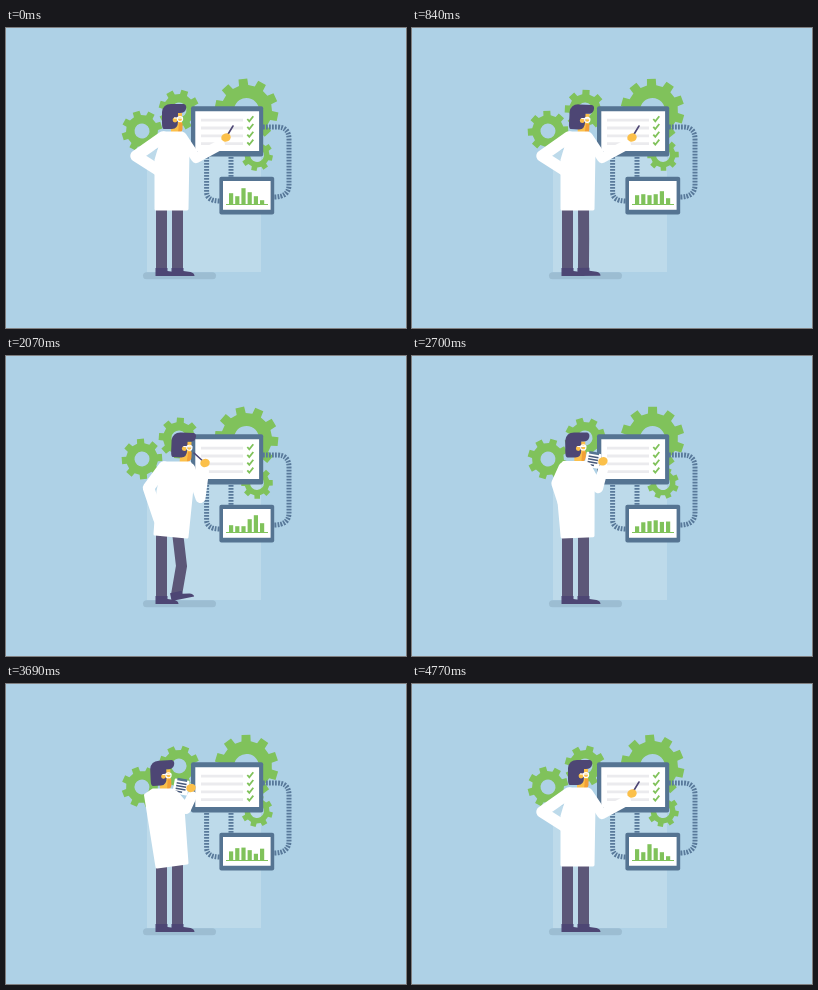
Write an HTML page with a canvas that moves like this. It is 400 by 300 pixels and loops after 4800 ms.

```html
<!DOCTYPE html>
<html>
<head>
<meta charset="utf-8">
<style>
  html, body { margin: 0; width: 100%; height: 100%; overflow: hidden; background: #aed1e6; }
  canvas { display: block; width: 400px; height: 300px; }
</style>
</head>
<body>
<canvas id="stage" width="400" height="300"></canvas>
<script>
const ctx = document.getElementById('stage').getContext('2d');
const LOOP = 4800;
const SKY = '#aed1e6', GREEN = '#80c25b', STEEL = '#557492', NAVY = '#4d4674', LEG = '#5c5778', SKIN = '#fbc04a';

const mix = (a, b, k) => Array.isArray(a) ? a.map((v, i) => mix(v, b[i], k)) : a + (b - a) * k;
const ease = k => k * k * (3 - 2 * k);
const bump = (t, from, to) => t > from && t < to ? Math.sin(Math.PI * (t - from) / (to - from)) ** 2 : 0;

// Points are flat x, y pairs; head is x, y, tilt.
const point = {
  head: [168, 104, 0],
  coat: [158, 105, 176, 105, 182, 122, 181, 181, 150, 181, 150, 132],
  back: [157, 109, 130, 128, 152, 142],
  arm: [176, 109, 190, 130, 214, 117],
  hand: [220, 109.5], pen: [227, 98]
};
const think = {
  head: [176.8, 104.5, 0.04],
  coat: [158, 107, 184, 107, 187, 122, 181, 181, 149, 178, 152, 135],
  back: [158, 111, 142.5, 132, 153, 163],
  arm: [184, 112, 194.5, 142, 198, 115],
  hand: [199, 107], pen: [188, 97]
};
const read = {
  head: [157, 104.5, -0.04],
  coat: [147, 106, 166, 106, 177, 124, 181, 179, 151, 183, 139.5, 111],
  back: [148, 112, 147, 124, 157, 155],
  arm: [168, 111, 180, 125, 186, 112],
  hand: [185, 104], pen: [183, 99]
};
const poses = [[0, point], [880, point], [1250, think], [2480, think], [2880, read], [4290, read], [4620, point], [LOOP, point]];
const charts = [
  [0, [11, 8, 16, 12, 8, 4]], [840, [9, 10, 9, 10, 13, 6]], [1350, [5, 13, 5, 12, 18, 9]],
  [2070, [7, 6, 6, 13, 17, 9]], [3240, [5, 13, 15, 11, 5, 12]], [4170, [13, 11, 10, 9, 8, 11]],
  [4740, [11, 8, 16, 12, 8, 4]], [LOOP, [11, 8, 16, 12, 8, 4]]
];

function span(keys, t) {
  const i = keys.findIndex(k => k[0] > t);
  const [[t0, a], [t1, b]] = [keys[i - 1], keys[i]];
  return [a, b, ease((t - t0) / (t1 - t0))];
}

function trace(pts, close) {
  ctx.beginPath();
  for (let i = 0; i < pts.length; i += 2) ctx.lineTo(pts[i], pts[i + 1]);
  if (close) ctx.closePath();
}
function line(pts, color, width, cap = 'butt') {
  trace(pts);
  ctx.strokeStyle = color;
  ctx.lineWidth = width;
  ctx.lineCap = cap;
  ctx.lineJoin = cap === 'round' ? 'round' : 'miter';
  ctx.stroke();
}
function softShape(pts, color, width) {
  trace(pts, true);
  ctx.fillStyle = ctx.strokeStyle = color;
  ctx.lineWidth = width;
  ctx.lineJoin = 'round';
  ctx.fill();
  ctx.stroke();
}
function box(x, y, w, h, color, r = 0) {
  ctx.fillStyle = color;
  ctx.beginPath();
  ctx.roundRect(x, y, w, h, r);
  ctx.fill();
}
function fillPath(d, color) {
  ctx.fillStyle = color;
  ctx.fill(new Path2D(d));
}
function placed(x, y, angle, draw) {
  ctx.save();
  ctx.translate(x, y);
  ctx.rotate(angle);
  draw();
  ctx.restore();
}

function gear(x, y, radius, root, hole, teeth, angle) {
  placed(x, y, angle, () => {
    const step = 2 * Math.PI / teeth;
    ctx.beginPath();
    for (let i = 0; i < teeth; i++) {
      for (const [r, a] of [[root, -.29], [radius, -.22], [radius, .22], [root, .29]]) {
        const turn = (i + a) * step;
        ctx.lineTo(r * Math.cos(turn), r * Math.sin(turn));
      }
    }
    ctx.closePath();
    ctx.moveTo(hole, 0);
    ctx.arc(0, 0, hole, 0, 7);
    ctx.fillStyle = GREEN;
    ctx.fill('evenodd');
  });
}

function machine(t) {
  const turn = Math.PI * t / LOOP;
  box(141, 122, 114, 122, '#bddaea');
  gear(136, 103, 20.5, 16, 7.5, 8, .49 - turn);
  gear(173, 82, 20.5, 16, 7.5, 8, .29 + turn);
  gear(240.5, 82.5, 32, 25.5, 12.5, 10, .2 - turn);
  gear(251, 127, 16, 12.5, 7, 8, .2 + turn);

  ctx.strokeStyle = '#58799a';
  ctx.lineWidth = 5;
  ctx.lineCap = 'butt';
  ctx.setLineDash([1.8, 1.2]);
  ctx.stroke(new Path2D('M257 99H271Q283 99 283 111V157Q283 169 268 169M200.6 129V164Q200.6 173 214 173M225 129V149'));
  ctx.setLineDash([]);

  box(185, 78.3, 72.2, 50.2, STEEL, 2);
  box(189.3, 83.2, 63.8, 39.8, '#fff');
  for (let i = 0; i < 4; i++) {
    const y = 91 + i * 7.8;
    box(195, y - .2, 42, 2.8, '#ebebee');
    line([241.3, y, 243.3, y + 2.3, 247.3, y - 2.8], GREEN, 1.8);
  }

  box(213.4, 148.7, 54.8, 37.8, STEEL, 2);
  box(217, 153, 47.6, 28.8, '#fff');
  box(220, 176, 42, 1, GREEN);
  const heights = mix(...span(charts, t));
  heights.forEach((h, i) => box(223 + i * 6.2, 176.2 - h, 4.2, h, GREEN));
}

function shoe(x, y, angle) {
  placed(x, y, angle, () => fillPath('M-6-3H6V0L13 1Q17 2 17 5H-6Z', NAVY));
}

function head([x, y, tilt]) {
  placed(x, y, tilt, () => {
    fillPath('M-3-19H8V-4Q8 0 4 2H-3Z', SKIN);
    fillPath('M5-9H8.5V-3Q8 1 4 1Z', '#f29f36');
    fillPath('M-12-20Q-11-28-3-28H10Q13-27 12-23Q11-19 6-19H4V-11Q4-3-2-3H-10Q-12-3-12-9Z', NAVY);
    ctx.beginPath();
    ctx.arc(1, -12, 2.4, 0, 7);
    ctx.fillStyle = SKIN;
    ctx.fill();
    line([0, -14, 9, -14], '#fff', 1.2);
    ctx.strokeStyle = '#fff';
    ctx.lineWidth = 1.2;
    ctx.beginPath();
    ctx.ellipse(6, -13, 2.6, 2.5, 0, 0, 7);
    ctx.stroke();
  });
}

function notepad(x, y) {
  placed(x, y, .18, () => {
    box(-7.5, -7.5, 15, 15, '#fff', 1);
    box(-5, -8.5, 10, 2.5, STEEL);
    for (let i = 0; i < 4; i++) box(-5, -4.2 + i * 2.8, i === 3 ? 7 : 10, 1.6, '#46597a');
  });
}

function scientist(t) {
  const [from, to, k] = span(poses, t);
  const pose = {};
  for (const part in from) pose[part] = mix(from[part], to[part], k);
  const reading = (from === read ? 1 - k : 0) + (to === read ? k : 0);
  const lift = bump(t, 1650, 2480) + .15 * bump(t, 100, 1000);
  const nod = bump(t, 350, 1300);

  box(137, 244.3, 73, 7, '#9cbdd2', 3.5);
  line([155.5, 176, 155.5, 243], LEG, 11);
  shoe(155.5, 243, 0);
  const footX = 171.5 - lift, footY = 243 - 4 * lift;
  line([171.5, 176, 171.5 + 4 * lift, 210, footX, footY], LEG, 11);
  shoe(footX, footY, -.2 * lift);

  head([pose.head[0] + nod * .6, pose.head[1] + nod * .5, pose.head[2] + nod * .05]);
  line(pose.back, '#fff', 11.5, 'round');
  softShape(pose.coat, '#fff', 3);
  if (reading > .5) notepad(pose.hand[0] - 10, pose.hand[1] - 1);
  line(pose.arm, '#fff', 10, 'round');

  const [x, y] = pose.hand;
  if (reading < .5) line([x, y, ...pose.pen], NAVY, 1.6, 'round');
  ctx.fillStyle = SKIN;
  ctx.beginPath();
  ctx.ellipse(x, y, 4.8, 4.2, -.4, 0, 7);
  ctx.fill();
}

function frame() {
  const t = performance.now() % LOOP;
  ctx.fillStyle = SKY;
  ctx.fillRect(0, 0, 400, 300);
  machine(t);
  scientist(t);
  requestAnimationFrame(frame);
}
frame();
</script>
</body>
</html>
```
